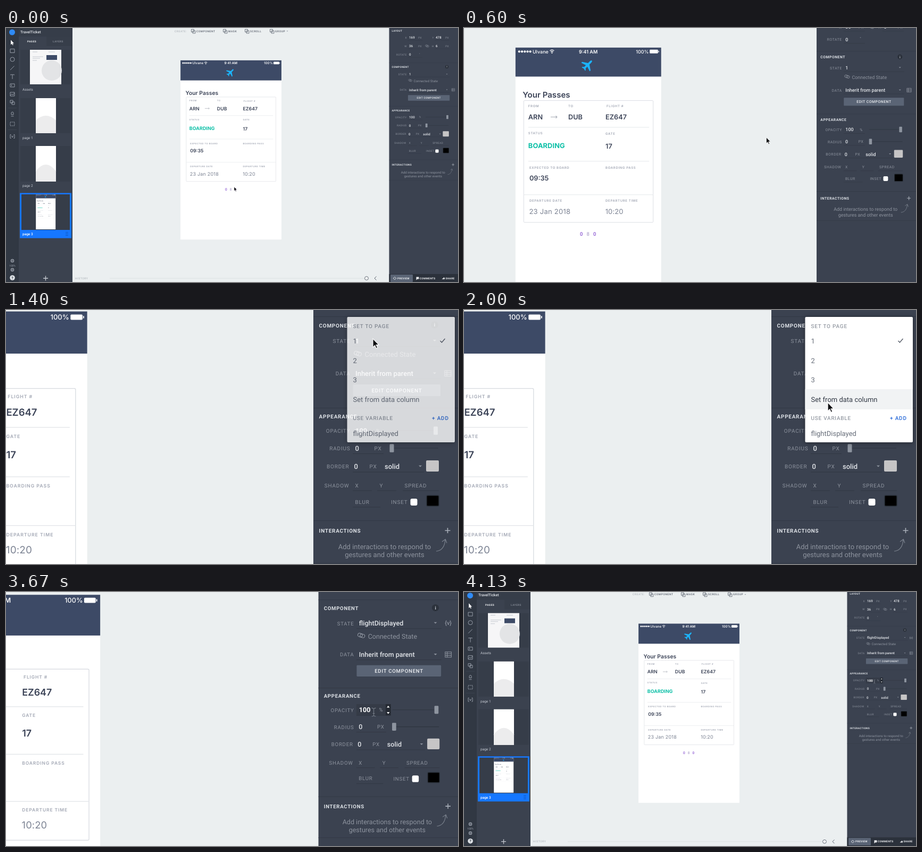
An HTML page that plays this animation: 850x478 px, repeating every 4670 ms.

```html
<!DOCTYPE html>
<html lang="en">
<head>
<meta charset="utf-8">
<title>Design editor</title>
<style>
html, body { margin: 0; width: 100%; height: 100%; overflow: hidden; background: #ebeff0; }
svg { display: block; width: 100vw; height: 100vh; }
text { white-space: pre; text-rendering: geometricPrecision; }
</style>
</head>
<body>
<svg id="stage" viewBox="0 0 850 478"></svg>
<script>
const LOOP = 4670, STEP = 200 / 3;
const CX = 850, CY = 113.7, ZOOM = 2.1, MID = 1.441, DRIFT = -1.3;
const UI = 'Roboto, sans-serif', APP = 'Inter, sans-serif';
const DIM = '#8d939e', LIGHT = '#e4e7eb', GROOVE = '#323944';

function el(parent, tag, attrs) {
  const n = document.createElementNS('http://www.w3.org/2000/svg', tag);
  for (const k in attrs) n.setAttribute(k, attrs[k]);
  parent.appendChild(n);
  return n;
}
const group = (p, attrs) => el(p, 'g', attrs || {});
const rect = (p, x, y, width, height, fill, more) =>
  el(p, 'rect', { x, y, width, height, fill, ...more });
const disc = (p, cx, cy, r, fill, more) => el(p, 'circle', { cx, cy, r, fill, ...more });
const line = (p, d, stroke, w, more) =>
  el(p, 'path', { d, fill: 'none', stroke, 'stroke-width': w, ...more });
const shape = (p, d, fill, more) => el(p, 'path', { d, fill, ...more });

// y is the middle of the capitals
function text(p, x, y, str, size, fill, o = {}) {
  const n = el(p, 'text', {
    x, y: y + size * 0.36, fill, 'font-size': size, 'font-family': o.font || UI,
    'font-weight': o.w || 400, 'letter-spacing': o.ls || 0, 'text-anchor': o.a || 'start'
  });
  n.textContent = str;
  return n;
}
const caret = (p, x, y, s = 3) => shape(p, `M${x - s} ${y - s / 2}h${2 * s}l${-s} ${s}z`, DIM);

// group whose units are stage pixels as seen at the given zoom
const at = (p, s) => group(p, {
  transform: `translate(${CX} ${CY}) scale(${1 / s}) translate(${-CX} ${-CY})`
});

const cam = group(document.getElementById('stage'));
rect(cam, 124, -20, 600, 520, '#ebeff0');

/* canvas bars */
text(cam, 317, 6, 'CREATE:', 5, '#a5abb3', { ls: .6 });
[[358, 'COMPONENT'], [418, 'MASK'], [459, 'SCROLL'], [506, 'GROUP']].forEach(([x, s]) => {
  text(cam, x, 6, s, 5, '#59606c', { w: 500, ls: .55 });
  line(cam, `M${x - 9.5} 2.5h5v5h-5zM${x - 7} 5h5v5h-5z`, '#59606c', .8);
});
caret(cam, 529, 6, 1.5);
text(cam, 130, 471, 'HISTORY', 5, '#a5abb3', { ls: .6 });
line(cam, 'M195 471H675', '#d9dddf', .8);
disc(cam, 678, 471, 3.4, '#f6f8f8', { stroke: '#59606c', 'stroke-width': .9 });
line(cam, 'M696.5 467.5L693 471L696.5 474.5', '#59606c', 1);

/* left side */
rect(cam, 0, -5, 24, 490, '#313843');
rect(cam, 24, -5, 101, 490, '#3b424f');
rect(cam, 24, -5, 101, 21, '#363d49');
rect(cam, 76, 16, 49, 18, '#373e4a');
disc(cam, 11.5, 8, 5.5, '#2f8bf7');
text(cam, 27, 7, 'TravelTicket', 7, '#e6e9ee', { w: 500 });
text(cam, 40, 25.5, 'PAGES', 4.8, '#f2f4f6', { w: 700, ls: .5 });
text(cam, 88, 25.5, 'LAYERS', 4.8, DIM, { w: 500, ls: .5 });
shape(cam, 'M9 22.5V31.5L11 29.6L12.5 32.5L13.8 31.8L12.4 29L15 29Z', '#fff');
line(cam, 'M8 39.5h8v7h-8zM8 79L15.5 71.5M8.5 88.5V87.8H15.5V88.5M12 88V96M8 105h8v6h-8zM10.5 106.5v3' +
  'M8 121h8v7h-8zM8 127l3-3 2 2 3-4M8 136h5v5h-5zM11 139h5v5h-5zM10 160a2 2 0 0 1 4 0v3h-4zM9.5 166h5' +
  'M9.5 200.5H8v7h1.5M14.5 200.5H16v7h-1.5M10.3 202.5L12 206L13.7 202.5', '#a0a6b1', .9);
disc(cam, 12, 59, 4, 'none', { stroke: '#a0a6b1', 'stroke-width': .9 });
line(cam, 'M8 177h8v7h-8z', '#a0a6b1', .9, { 'stroke-dasharray': '2 1' });
line(cam, 'M4 150.5h16M4 191.5h16', '#434a56', .7);
[438, 455].forEach(y => {
  disc(cam, 12, y, 2.6, 'none', { stroke: '#a0a6b1', 'stroke-width': 1.2 });
  disc(cam, 12, y, 1, '#a0a6b1');
});
text(cam, 12, 447, '100%', 4.8, '#a0a6b1', { a: 'middle' });
disc(cam, 12, 470, 4.8, '#dfe3e8');
text(cam, 12, 470, '?', 7, '#313843', { w: 700, a: 'middle' });
line(cam, 'M74.5 466.5v9M70 471h9', '#c4c8d0', 1.3);

[[41, 65], [132, 66], [222, 67]].forEach(([y, h]) => rect(cam, 27, y, 95, h, '#363d49'));
rect(cam, 45, 41, 59, 65, '#f6f6f7');
disc(cam, 86, 80, 19, '#e3e4e6');
rect(cam, 76, 51, 20, 9, '#3d4a66');
line(cam, 'M50 45h9M80 45h12M50 54h20M50 57h14M50 61h8', '#c6cad1', 1);
[[132, 66, 33, 21], [222, 67, 35, 30]].forEach(([y, h, drop, r]) => {
  rect(cam, 56, y, 38, h, '#fff');
  const b = y + h, top = y + drop;
  shape(cam, `M56 ${b}V${top + r * .42}Q75 ${top - r * .42} 94 ${top + r * .42}V${b}Z`, '#ececed');
});
rect(cam, 26, 310.5, 97, 85, '#1677ff');
rect(cam, 29, 313, 91, 67, '#363d49');
[['Assets', 116], ['page 1', 206.5], ['page 2', 297]].forEach(([s, y]) =>
  text(cam, 31, y, s, 6.5, '#c5cad2'));
text(cam, 31, 387.5, 'page 3', 6.5, '#fff', { w: 500 });
line(cam, 'M112 384.5h5M112 387.5h5M112 390.5h5', '#0d55bd', .9);

/* phone, drawn at the middle zoom */
const phone = at(cam, MID);
phone.id = 'phone';
rect(phone, 98, 37.5, 273.5, 486, '#fff');
rect(phone, 98, 37.5, 273.5, 54.5, '#3d4a66');
for (let i = 0; i < 5; i++) disc(phone, 105 + i * 5.2, 45, 2.1, '#fff');
const app = (x, y, s, size, fill, w, ls, a) => text(phone, x, y, s, size, fill, { font: APP, w, ls, a });
app(130, 45, 'Ulvane', 9, '#fff', 500);
line(phone, 'M162.5 43.5Q166.5 40 170.5 43.5M164.2 45.6Q166.5 43.6 168.8 45.6', '#fff', 1.3);
disc(phone, 166.5, 47.6, 1.1, '#fff');
app(234.5, 45, '9:41 AM', 9, '#fff', 600, 0, 'middle');
app(348.3, 45, '100%', 9, '#fff', 500, 0, 'end');
rect(phone, 350, 41.5, 15.5, 6.8, '#fff', { rx: 1.2 });
rect(phone, 366.2, 43.4, 1.3, 3, '#fff');
shape(phone, 'M0 -10C1.3 -10 1.7 -8 1.7 -6V-2.5L10 3V5.2L1.7 2.5V6.5L4 8.6V10L0 9L-4 10V8.6L-1.7 6.5V2.5L-10 5.2V3' +
  'L-1.7 -2.5V-6C-1.7 -8 -1.3 -10 0 -10Z', '#1cb4fb', { transform: 'translate(233.5 70) rotate(45) scale(1.12)' });
app(111.5, 126, 'Your Passes', 15, '#3b4357', 600);
rect(phone, 113.5, 137, 243, 229, 'none', { stroke: '#d6d9df', 'stroke-width': .85, rx: 1.5 });
line(phone, 'M122 187.3H349M122 251H349M114 314H356', '#e1e4e8', .85);
line(phone, 'M164 168H176M173.5 165.5L176 168L173.5 170.5', '#a4a9b3', 1);
[[122, 147, 'FROM'], [197, 147, 'TO'], [269, 147.3, 'FLIGHT #'], [122, 198, 'STATUS'], [267, 199, 'GATE'],
 [124, 262.8, 'EXPECTED TO BOARD'], [267, 262.8, 'BOARDING PASS'],
 [124, 325.5, 'DEPARTURE DATE'], [267, 325.5, 'DEPARTURE TIME']
].forEach(([x, y, s]) => app(x, y, s, 6, '#a3a8b5', 600, .66));
[[122, 168, 'ARN'], [197, 168, 'DUB'], [267, 168, 'EZ647'], [267, 222.8, '17'], [124, 283, '09:35']
].forEach(([x, y, s]) => app(x, y, s, 12.7, '#3b4357', 600));
app(122, 221.5, 'BOARDING', 12.8, '#0abfa6', 700, .1);
app(123.5, 345.2, '23 Jan 2018', 13, '#7c8393', 400, .25);
app(266.6, 345.2, '10:20', 13, '#7c8393', 400, .1);

el(cam, 'use', { href: '#phone', transform: 'matrix(.195 0 0 .195 -7.8 301.3)' });

const dots = at(cam, MID);
[[221.7, '0', '#8a55d2'], [234.2, '8', '#b3a9cd'], [246.7, '0', '#8a55d2']].forEach(([x, s, c]) =>
  text(dots, x, 388, s, 9.5, c, { a: 'middle', w: 500 }));

/* inspector, drawn at the full zoom */
const panel = at(cam, ZOOM);
rect(panel, 578, -160, 300, 1070, '#3b4250');
const head = (y, s) => text(panel, 588.5, y, s, 10, '#dde1e6', { w: 700, ls: .72 });
const label = (x, y, s, a) => text(panel, x, y, s, 10, DIM, { ls: .8, a });
const value = (x, y, s) => text(panel, x, y, s, 13, LIGHT, { w: 500 });
const under = (x, y, w) => line(panel, `M${x} ${y}h${w}`, GROOVE, 1);

line(panel, 'M578 12.5H850M578 184.5H850M578 396.5H850M578 476.5H850', '#333a46', 1);
head(-115, 'LAYOUT');
[[-87, 'X', '169', 'Y', '478'], [-53.5, 'W', '36', 'H', '6']].forEach(([y, a, b, c, d]) => {
  label(648, y, a, 'end'); value(657, y, b); label(693, y, 'PX');
  label(755, y, c, 'end'); value(762, y, d); label(800, y, 'PX');
  under(652, y + 11, 58); under(758, y + 11, 58);
});
link(728, -54);
label(647.5, -20, 'ROTATE', 'end'); value(657, -20, '0'); label(696, -22, '°');
under(652, -9, 58);

function link(x, y) {
  const ring = dx => rect(panel, x + dx - 4.6, y - 3.4, 9.2, 6.8, 'none', {
    rx: 3.4, stroke: DIM, 'stroke-width': 1.2, transform: `rotate(18 ${x} ${y})`
  });
  ring(-2.4);
  ring(2.4);
}

head(29, 'COMPONENT');
disc(panel, 806, 28, 6.8, '#2c323c');
text(panel, 806, 28, 'i', 9, '#c5cad2', { w: 700, a: 'middle' });
label(647.5, 58.5, 'STATE', 'end');
const before = value(657, 58.2, '1');
const after = group(panel);
text(after, 657, 58.2, 'flightDisplayed', 13, LIGHT, { w: 500 });
text(after, 831, 57.5, '{v}', 11.5, '#a3a9b3', { a: 'middle' });
caret(panel, 806, 57.5); under(652, 68.5, 166);
link(661.5, 82);
text(panel, 674.5, 83.5, 'Connected State', 13, DIM);
label(647.5, 119.5, 'DATA', 'end');
value(657, 119.2, 'Inherit from parent');
caret(panel, 806, 119); under(652, 129.5, 166);
line(panel, 'M825 114h12v10.5h-12zM825 117.5h12M825 121h12M829 114v10.5', DIM, 1.1);
rect(panel, 652.5, 140, 164.5, 22, '#5a6475', { rx: 1.5 });
text(panel, 735, 151.3, 'EDIT COMPONENT', 10, '#eef0f3', { w: 500, ls: .76, a: 'middle' });

head(200, 'APPEARANCE');
label(647.5, 227.5, 'OPACITY', 'end');
const spin = group(panel);
rect(spin, 652, 216, 67, 22, '#353b47');
rect(spin, 709, 216, 10, 22, '#252a33');
shape(spin, 'M711.2 222.5h5.6l-2.8 -3.6zM711.2 231.5h5.6l-2.8 3.6z', '#fff');
const opacity = value(657, 227, '100');
label(696, 227, '%'); under(652, 238, 58);
label(647.5, 260.5, 'RADIUS', 'end'); value(656.5, 260, '0'); label(692.5, 260, 'PX'); under(652, 270.5, 58);
[[227, 804], [260, 721.5]].forEach(([y, x]) => {
  line(panel, `M722 ${y}H813`, '#2f3540', 1.2);
  rect(panel, x, y - 7.7, 8, 15.4, '#8d949f', { rx: 1.5 });
});
label(645.5, 294, 'BORDER', 'end'); value(654.5, 294.5, '0'); label(683.5, 294, 'PX'); value(712, 294.5, 'solid');
caret(panel, 779, 294); under(652, 305, 134);
rect(panel, 790, 283, 24, 21, '#c6c5c6', { rx: 2 });
label(645.5, 330, 'SHADOW', 'end'); label(656.5, 330, 'X'); label(702.5, 330, 'Y'); label(749.5, 330, 'SPREAD');
under(652, 340, 36); under(698, 340, 36); under(746, 340, 68);
label(656.5, 361, 'BLUR'); label(724, 361.5, 'INSET'); under(652, 371, 52);
rect(panel, 760.5, 355, 13, 13, '#fff', { rx: 3 });
rect(panel, 791, 349, 23, 20, '#000', { rx: 2, stroke: '#2a3039', 'stroke-width': 1.5 });

head(415, 'INTERACTIONS');
line(panel, 'M830.5 410v10M825.5 415h10', '#a9afb9', 1.6);
['Add interactions to respond to', 'gestures and other events'].forEach((s, i) =>
  text(panel, 712, 445.5 + i * 15.3, s, 13, DIM, { a: 'middle' }));
line(panel, 'M809 454C819 453 825 446 826 432M820 436L826.3 431.5L829 438.5', '#7b828e', 1.2);

/* bottom of the inspector */
rect(cam, 720.5, 463, 140, 25, '#2b313b');
rect(cam, 723, 464, 42, 14, '#5a6475', { rx: 1 });
line(cam, 'M728 471l3 -2.5 3 2.5 -3 2.5z', '#eef0f3', .8);
shape(cam, 'M771.5 468.5h5v4h-3l-2 2zM820 473.5q.5 -3 3 -3v-1.7l2.5 2.5 -2.5 2.5v-1.6q-2 0 -3 1.3z', '#eef0f3');
[[736, 'PREVIEW'], [778, 'COMMENTS'], [826.5, 'SHARE']].forEach(([x, s]) =>
  text(cam, x, 471, s, 4.9, '#eef0f3', { w: 700, ls: .3 }));

/* state menu */
const menu = at(cam, ZOOM);
menu.style.filter = 'drop-shadow(0 1px 4px rgba(0,0,0,.4))';
rect(menu, 641.5, 13, 202.5, 236, '#fff', { rx: 2 });
const hover = rect(menu, 641.5, 0, 202.5, 36, '#f1f3f4');
const ROWS = [[77, 113], [113, 149], [149, 187], [213, 249]];
const items = [['1', 58.5], ['2', 95], ['3', 131], ['Set from data column', 168.5], ['flightDisplayed', 232]]
  .map(([s, y]) => text(menu, 652.5, y, s, 13, '#666d79'));
text(menu, 652.5, 30.5, 'SET TO PAGE', 10, '#7b828d', { ls: .8 });
text(menu, 652.5, 203.5, 'USE VARIABLE', 10, '#7b828d', { ls: .8 });
text(menu, 801, 203.5, '+ ADD', 10, '#2467d8', { w: 500, ls: .8 });
line(menu, 'M816.5 58L819.5 61L825.5 54', '#4d5460', 1.3);

/* pointer */
const pointer = group(cam);
const arrow = shape(pointer, 'M0 0V16L3.7 12.6L6.2 18.2L8.7 17.1L6.2 11.6H11.2Z', '#0b0c0e',
  { stroke: '#fff', 'stroke-width': 1.1 });
const beam = line(pointer, 'M-4 1.5Q0 1.5 0 4V15Q0 17.5 -4 17.5M4 1.5Q0 1.5 0 4V15Q0 17.5 4 17.5M-2 12H2', '#777e89', 1.1);

// step, x, y on the unzoomed stage
const PATH = [[3, 429, 299], [6, 568, 234], [9, 655, 178], [11, 705, 135], [13, 741, 104], [15, 763, 90],
  [17, 773.8, 85.3], [24, 773.8, 85.3], [27, 772, 114], [30, 771, 142.5], [32, 771, 152.5], [36, 771.8, 165.3]];
function along(k) {
  const i = PATH.findIndex(p => p[0] > k);
  if (i === 0) return PATH[0].slice(1);
  if (i < 0) return PATH[PATH.length - 1].slice(1);
  const a = PATH[i - 1], b = PATH[i], u = (k - a[0]) / (b[0] - a[0]);
  return [a[1] + (b[1] - a[1]) * u, a[2] + (b[2] - a[2]) * u];
}
const ease = u => (1 - Math.cos(Math.PI * Math.min(1, Math.max(0, u)))) / 2;
const show = (n, on) => n.setAttribute('visibility', on ? 'visible' : 'hidden');
const MENU_FADE = { 20: .4, 21: .8, 39: .4 };

function draw(t) {
  const k = Math.floor((t + 5) / STEP);
  const leaving = k >= 55;
  const p = leaving ? 1 - ease((k - 53.6) / 8.4) : ease((k - 4.6) / 10.05);
  // the view rides slightly high while it moves and settles when fully zoomed
  const dy = leaving ? DRIFT : p < 1 ? DRIFT * p : 0;
  cam.setAttribute('transform',
    `translate(${CX} ${CY + dy}) scale(${1 + (ZOOM - 1) * p}) translate(${-CX} ${-CY})`);

  const [x, y] = along(k);
  pointer.setAttribute('transform', `translate(${x} ${y}) scale(${1 / ZOOM})`);
  const done = k >= 40;
  show(arrow, !done);
  show(beam, done);
  show(spin, done);
  opacity.setAttribute('fill', done ? '#fff' : LIGHT);
  opacity.setAttribute('font-weight', done ? 700 : 500);
  show(before, k < 39);
  show(after, k >= 39);

  const open = k >= 20 && k < 40;
  menu.style.display = open ? '' : 'none';
  menu.style.opacity = MENU_FADE[k] || 1;
  const my = CY + (y - CY) * ZOOM;
  const row = ROWS.findIndex(r => my >= r[0] && my < r[1]);
  show(hover, open && row >= 0);
  if (row >= 0) {
    hover.setAttribute('y', ROWS[row][0]);
    hover.setAttribute('height', ROWS[row][1] - ROWS[row][0]);
  }
  items.forEach((n, i) => n.setAttribute('fill', row >= 0 && i === row + 1 ? '#333a46' : '#666d79'));
}

const start = performance.now();
function tick() {
  draw((performance.now() - start) % LOOP);
  requestAnimationFrame(tick);
}
tick();
</script>
</body>
</html>
```
